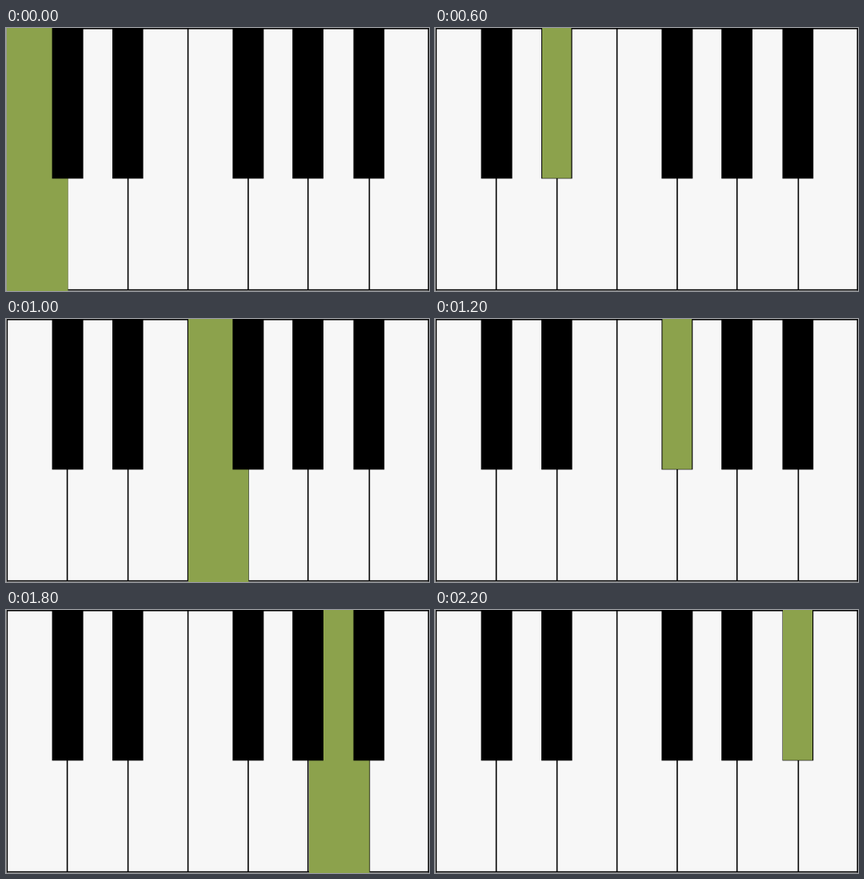
An HTML page with a canvas for the animation above (2.4 s loop, 529x329 px).

```html
<!DOCTYPE html>
<html lang="en">
<head>
<meta charset="utf-8">
<title>Piano octave</title>
<style>
html, body { margin: 0; width: 529px; height: 329px; overflow: hidden; background: #f7f7f7; }
canvas { display: block; }
</style>
</head>
<body>
<canvas id="stage" width="529" height="329"></canvas>
<script>
const ctx = document.getElementById('stage').getContext('2d');
const W = 529, H = 329, KEY_H = 188, STEP = 200;
const GREEN = '#8ca24c', WHITE = '#f7f7f7', BLACK = '#000';

// Left and right edges of the lit area
const whites = {
  C: [1, 77.5], D: [77.5, 152.5], E: [153, 227.5], F: [228, 303.3],
  G: [304, 379], A: [379, 454.5], B: [456, 529]
};
const blacks = {
  Cs: [57.5, 95.4], Ds: [134, 170.4], Fs: [284.4, 321.2],
  Gs: [359, 396], As: [435, 472]
};
const bodies = [[57.6, 96.6], [133, 171.6], [283.4, 322.3], [358.2, 397], [434.5, 473.2]];
const dividers = [75.8, 151.8, 226.8, 302.1, 376.9, 453.6];
const order = ['C', 'Cs', 'D', 'Ds', 'E', 'F', 'Fs', 'G', 'Gs', 'A', 'B', 'As'];

function box(color, x0, x1, y0, y1) {
  ctx.fillStyle = color;
  ctx.fillRect(x0, y0, x1 - x0, y1 - y0);
}

function draw(key) {
  box(WHITE, 0, W, 0, H);
  box('#aaa', 0, 1, 0, H);
  box(BLACK, 1, W, 0, 1.5);
  box(BLACK, 1, W, 326.8, 328.5);
  box(BLACK, 0.9, 2.2, 0, 328.5);
  box(BLACK, 527.6, W, 0, 328.5);
  for (const x of dividers) box(BLACK, x, x + 1.6, 0, 328);

  if (whites[key]) {
    if (key === 'B') box(WHITE, 455, 456, KEY_H, 326.8);
    box(GREEN, ...whites[key], 0, H);
  }
  for (const [x0, x1] of bodies) box(BLACK, x0, x1, 0, KEY_H + 0.4);
  if (blacks[key]) box(GREEN, ...blacks[key], 0, KEY_H - 0.2);
}

function tick(now) {
  draw(order[Math.floor(now / STEP) % order.length]);
  requestAnimationFrame(tick);
}
draw(order[0]);
requestAnimationFrame(tick);
</script>
</body>
</html>
```
